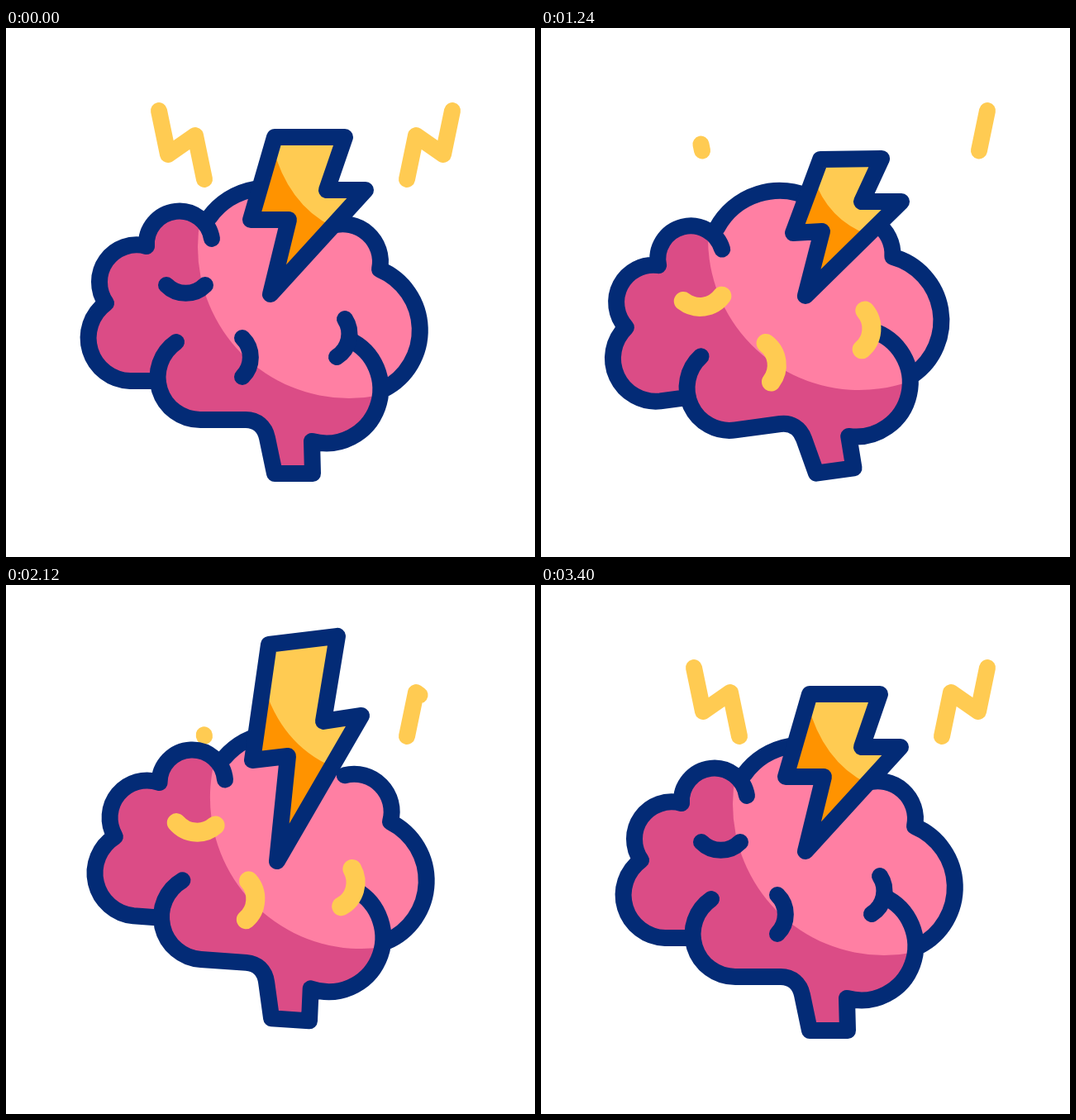
An HTML page with a canvas for the animation above (3600 ms loop, 640 by 640 pixels).

```html
<!DOCTYPE html>
<html lang="en">
<head>
<meta charset="utf-8">
<title>Brainstorm</title>
<style>
  html, body { margin: 0; width: 100%; height: 100%; overflow: hidden; background: #fff; }
  canvas { display: block; width: 100vw; height: 100vh; }
</style>
</head>
<body>
<canvas id="stage" width="640" height="640"></canvas>
<script>
const ctx = document.getElementById('stage').getContext('2d');
const LOOP = 3600;
const NAVY = '#032b76', YELLOW = '#ffcb52', ORANGE = '#ff9300', PINK = '#ff7fa3', ROSE = '#db4c86';
const PIVOT = { x: 348, y: 482 };

// Brain geometry
const fillShape = new Path2D(`M185 427 L150 427 A52 52 0 0 1 121 333 A45 45 0 0 1 170 264
  A39.8 39.8 0 0 1 249 255 L246 229 A86.3 86.3 0 0 1 365 209 L393 239.6
  A45.5 45.5 0 0 1 452 292 A80 80 0 0 1 457 437 A66 66 0 0 1 370 500
  L371 539 L325 539 L316 496 C313 482 303 474 290 474 L235 474 A51.5 51.5 0 0 1 185 427 Z`);
const outline = new Path2D(`M184 427 L150 427 A52 52 0 0 1 121 333 A45 45 0 0 1 170 264
  A39.8 39.8 0 0 1 249 255 M246 229 A86.3 86.3 0 0 1 365 209
  M393 239.6 A45.5 45.5 0 0 1 452 292 A80 80 0 0 1 457 437
  M415 377 A65.7 65.7 0 0 1 370 500 L371 539 L325 539 L316 496
  C313 482 303 474 290 474 L235 474 A51.5 51.5 0 0 1 206 380`);
const folds = [
  'M194 311 A33 33 0 0 0 241 311',
  'M286 375 A33 33 0 0 1 286 422',
  'M410 352 A33 33 0 0 1 400 398'
].map(d => new Path2D(d));
const FOLD_LEN = 53;

// Sparks run from the top end to the bottom end
const sparks = [
  { path: new Path2D('M540 100 L529 153 L496 130 L485 183'), lag: 0 },
  { path: new Path2D('M185 100 L196 153 L229 130 L240 183'), lag: 260 }
];
const SPARK_LEN = 2 * Math.hypot(11, 53) + Math.hypot(33, 23);

// Time, tilt in degrees, vertical shift
const brainKeys = [
  [150, 0, 0], [520, -2, -20], [680, -5.8, -30], [960, -11.8, -34], [1240, -7.8, -3],
  [1600, 7, 26.5], [1660, 8, 28], [1760, 8.3, 23], [2120, 4, -13], [2300, -3.5, -29],
  [2520, -10.3, -35.5], [2640, -11.8, -32], [2840, -10.3, -14], [3400, 0, 0]
];

// Seven corners clockwise from the top left, then where the shade starts on the left edge
const pose = {
  rest:  [325, 132, 410, 132, 388, 196, 435, 196, 320, 322, 342, 232, 296, 232, 0.1],
  rise:  [330, 84, 412, 80, 387, 180, 433, 177, 318, 340, 341, 217, 296, 219, 0.38],
  peak:  [318, 64, 400, 54, 384, 163, 430, 156, 328, 336, 341, 206, 298, 212, 0.34],
  high:  [318, 72, 401, 62, 384, 165, 430, 158, 328, 334, 341, 207, 298, 212, 0.34],
  lean:  [307, 98, 389, 81, 382, 161, 427, 152, 341, 312, 341, 207, 299, 216, 0.27],
  squat: [338, 159, 412, 158, 388, 210, 436, 210, 320, 324, 340, 246, 305, 248, 0.25],
  tilt:  [365, 132, 442, 149, 395, 224, 440, 235, 290, 350, 340, 250, 300, 240, 0.42]
};
const boltKeys = [
  [150, 'rest'], [520, 'rise'], [700, 'peak'], [960, 'lean'], [1240, 'squat'], [1600, 'tilt'],
  [1680, 'tilt'], [2120, 'high'], [2190, 'peak'], [2520, 'lean'], [2900, 'squat'], [3400, 'rest']
].map(([t, name]) => [t, ...pose[name]]);

function ease(t, start, length) {
  const x = Math.min(1, Math.max(0, (t - start) / length));
  return x * x * (3 - 2 * x);
}

// Monotone cubic interpolation through the keys
function sample(keys, t) {
  const last = keys.length - 1;
  if (t <= keys[0][0]) return keys[0].slice(1);
  if (t >= keys[last][0]) return keys[last].slice(1);
  let i = 0;
  while (t >= keys[i + 1][0]) i++;
  const span = keys[i + 1][0] - keys[i][0];
  const x = (t - keys[i][0]) / span;
  const slope = (k, c) => (keys[k + 1][c] - keys[k][c]) / (keys[k + 1][0] - keys[k][0]);
  const tangent = (k, c) => {
    if (k === 0 || k === last) return 0;
    const a = slope(k - 1, c), b = slope(k, c);
    return a * b <= 0 ? 0 : 2 * a * b / (a + b);
  };
  return keys[i].slice(1).map((p, n) => {
    const c = n + 1, d = keys[i + 1][c] - p;
    return p + d * x * x * (3 - 2 * x)
      + span * x * (1 - x) * ((1 - x) * tangent(i, c) - x * tangent(i + 1, c));
  });
}

function stroke(path, color, width) {
  ctx.strokeStyle = color;
  ctx.lineWidth = width;
  ctx.stroke(path);
}

function strokePart(path, length, from, to, color, width) {
  ctx.setLineDash([Math.max(0.01, (to - from) * length), 999]);
  ctx.lineDashOffset = -from * length;
  stroke(path, color, width);
  ctx.setLineDash([]);
}

function drawSpark({ path, lag }, t) {
  let from = 0, to = 1;
  if (t < 590 + lag) {
    to = 1 - ease(t, 150 + lag * 0.68, 416);
  } else if (t < 1700) {
    from = 1 - ease(t, 590 + lag, 600);
    to = 1 - ease(t, 986, 416);
  } else {
    from = 1 - ease(t, 1817 + lag, 700);
  }
  if (from === 1) return;
  strokePart(path, SPARK_LEN, Math.min(from, to), Math.max(from, to), YELLOW, 20);
}

function drawBrain(t) {
  const [angle, dy] = sample(brainKeys, t);
  ctx.save();
  ctx.translate(PIVOT.x, PIVOT.y + dy);
  ctx.rotate(angle * Math.PI / 180);
  ctx.translate(-PIVOT.x, -PIVOT.y);

  ctx.save();
  ctx.clip(fillShape);
  ctx.fillStyle = ROSE;
  ctx.fillRect(60, 160, 480, 400);
  ctx.fillStyle = PINK;
  ctx.beginPath();
  ctx.arc(415, 265, 183, 0, 2 * Math.PI);
  ctx.fill();
  ctx.restore();

  stroke(outline, NAVY, 20);
  const to = ease(t, 200, 260), from = ease(t, 2180, 260);
  for (const fold of folds) {
    stroke(fold, NAVY, 20);
    if (to > from) strokePart(fold, FOLD_LEN, from, to, YELLOW, 23);
  }
  ctx.restore();
}

function drawBolt(t) {
  const p = sample(boltKeys, t);
  const corner = i => [p[2 * i], p[2 * i + 1]];
  const mix = (a, b, k) => [a[0] + (b[0] - a[0]) * k, a[1] + (b[1] - a[1]) * k];
  const body = new Path2D();
  for (let i = 0; i < 7; i++) body.lineTo(...corner(i));
  body.closePath();

  ctx.fillStyle = YELLOW;
  ctx.fill(body);

  const a = mix(corner(0), corner(6), p[14]);
  const b = mix(corner(3), corner(4), 0.35);
  ctx.save();
  ctx.clip(body);
  ctx.fillStyle = ORANGE;
  ctx.beginPath();
  ctx.moveTo(...a);
  ctx.quadraticCurveTo(a[0] + (b[0] - a[0]) * 0.26, a[1] + (b[1] - a[1]) * 0.73, ...b);
  for (const i of [4, 5, 6]) ctx.lineTo(...corner(i));
  ctx.fill();
  ctx.restore();

  stroke(body, NAVY, 20);
}

function draw(t) {
  ctx.fillStyle = '#fff';
  ctx.fillRect(0, 0, 640, 640);
  ctx.lineCap = ctx.lineJoin = 'round';
  sparks.forEach(s => drawSpark(s, t));
  drawBrain(t);
  drawBolt(t);
}

const begin = performance.now();
function tick() {
  draw((performance.now() - begin) % LOOP);
  requestAnimationFrame(tick);
}
tick();
</script>
</body>
</html>
```
